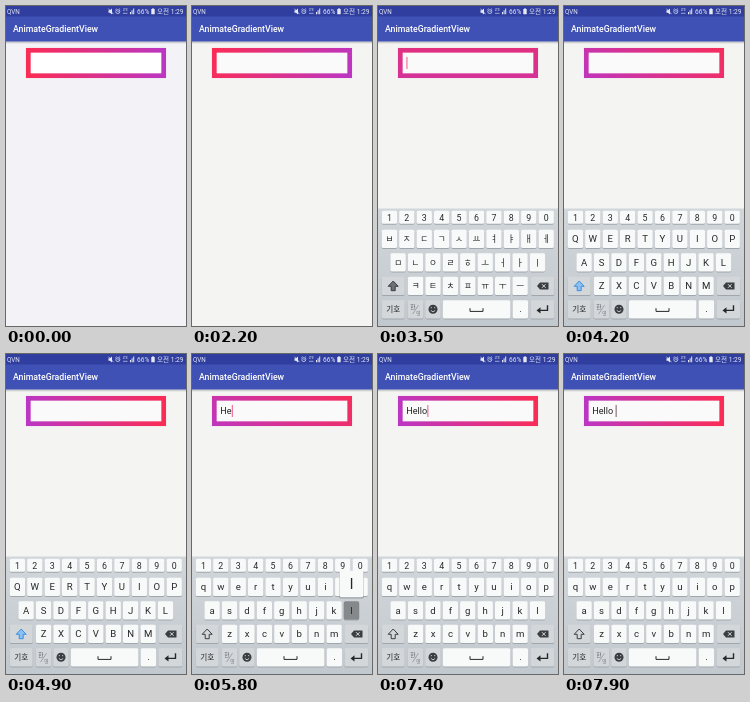
Write an HTML page that moves like this. It is 180 px wide and 320 px high and loops after 8000 ms.

```html
<!DOCTYPE html>
<html lang="ko">
<head>
<meta charset="utf-8">
<title>AnimateGradientView</title>
<style>
html, body { margin: 0; width: 100%; height: 100%; overflow: hidden; background: #f4f4f3; }
svg { display: block; width: 100vw; height: 100vh; }
text { font-family: Roboto, "Noto Sans CJK KR", "Noto Sans CJK JP", "Noto Sans CJK", sans-serif; }
</style>
</head>
<body>
<svg id="stage" viewBox="0 0 180 320" xmlns="http://www.w3.org/2000/svg">
  <defs>
    <linearGradient id="sweep" gradientUnits="userSpaceOnUse">
      <stop offset="0" stop-color="#bb36c4"/><stop offset="1" stop-color="#fb2c54"/>
    </linearGradient>
    <linearGradient id="shade" x2="0" y2="1">
      <stop offset="0" stop-color="#000" stop-opacity=".25"/><stop offset="1" stop-color="#000" stop-opacity="0"/>
    </linearGradient>
    <linearGradient id="tray" x2="0" y2="1">
      <stop offset="0" stop-color="#d1d6da"/><stop offset="1" stop-color="#c2c9ce"/>
    </linearGradient>
  </defs>
  <rect id="page" width="180" height="320"/>
  <rect y="35.5" width="180" height="2.5" fill="url(#shade)"/>
  <rect width="180" height="35.5" fill="#3f51b5"/>
  <rect width="180" height="10.5" fill="#303f9f"/>
  <g fill="#e6e8f5" font-size="6.3">
    <text x="1" y="7.8">QVN</text>
    <text x="131" y="7.8" font-size="6.6">66%</text>
    <text x="177.5" y="7.8" font-size="6.6" text-anchor="end">오전 1:29</text>
    <path d="M102.5 4.2h1.5l2-1.7v6l-2-1.7h-1.5z"/>
    <path d="M102.5 2.7l5 5.5" stroke="#e6e8f5" stroke-width=".7"/>
    <circle cx="111.8" cy="5.6" r="2" fill="none" stroke="#e6e8f5" stroke-width=".7"/>
    <path d="M109.4 3.6l1.2-1.1M114.2 3.6L113 2.5M111.8 4.5v1.2h1" fill="none" stroke="#e6e8f5" stroke-width=".6"/>
    <text x="116.7" y="5.2" font-size="3.2">LTE</text>
    <path d="M117 7.3h4.5" stroke="#e6e8f5" stroke-width=".6"/>
    <path d="M124 8.2h1V6h-1zM125.6 8.2h1V4.3h-1zM127.2 8.2h1V2.5h-1z"/>
    <path d="M145.3 3.1h1v-.8h1.4v.8h1v5.2h-3.4z"/>
  </g>
  <text x="7" y="26.2" fill="#fff" font-size="8.75" font-weight="500">AnimateGradientView</text>
  <rect id="field" x="22.3" y="44.3" width="135.4" height="25.4" stroke="url(#sweep)" stroke-width="4.7"/>
  <text id="entry" x="28.3" y="60.2" font-size="9.1" fill="#222"></text>
  <rect id="caret" y="51" width=".9" height="12"/>
  <g id="keyboard"></g>
</svg>
<script>
const LOOP = 8000, STEP = 100;
const $ = id => document.getElementById(id);
const NS = "http://www.w3.org/2000/svg";
const INK = "#25282a", KEY = "#f8fafa", FN_KEY = "#d3d7da";

function add(parent, tag, attrs, label) {
  const el = document.createElementNS(NS, tag);
  for (const name in attrs) el.setAttribute(name, attrs[name]);
  if (label) el.textContent = label;
  parent.appendChild(el);
  return el;
}
const label = (parent, x, y, text, size = 9, fill = INK) =>
  add(parent, "text", { x, y, "font-size": size, fill, "text-anchor": "middle" }, text);

function key(parent, x, y, width, height = 18.3, fill = KEY) {
  add(parent, "rect", { x, y: y + 0.9, width, height, rx: 1.6, fill: "#9fa6ac" });
  return add(parent, "rect", { x, y, width, height, rx: 1.6, fill });
}
const stroke = (parent, d, color, width = 1) =>
  add(parent, "path", { d, fill: "none", stroke: color, "stroke-width": width, "stroke-linejoin": "round" });

// Letter rows: first key centre, key top
const PITCH = 17.42;
const ROWS = [{ x: 11.4, y: 223.7 }, { x: 20.1, y: 247.2 }, { x: 37.6, y: 270.7 }];
const LAYOUTS = {
  hangul: ["ㅂㅈㄷㄱㅅㅛㅕㅑㅐㅔ", "ㅁㄴㅇㄹㅎㅗㅓㅏㅣ", "ㅋㅌㅊㅍㅠㅜㅡ"],
  upper: ["QWERTYUIOP", "ASDFGHJKL", "ZXCVBNM"],
  lower: ["qwertyuiop", "asdfghjkl", "zxcvbnm"]
};
const board = $("keyboard");
const keys = {}, faces = {};

add(board, "rect", { y: 202.5, width: 180, height: 118, fill: "url(#tray)" });
[..."1234567890"].forEach((digit, i) => {
  const x = 11.4 + i * PITCH;
  key(board, x - 7.7, 204.8, 15.4, 13);
  label(board, x, 214.8, digit, 8.8);
});
ROWS.forEach((row, r) => [...LAYOUTS.lower[r]].forEach((char, i) => {
  const x = row.x + i * PITCH;
  keys[char] = { x, y: row.y, fill: KEY, el: key(board, x - 7.7, row.y, 15.4) };
}));
for (const name in LAYOUTS) {
  faces[name] = add(board, "g", {});
  ROWS.forEach((row, r) => [...LAYOUTS[name][r]].forEach((char, i) =>
    label(faces[name], row.x + i * PITCH, row.y + 12.4, char, name === "hangul" ? 8.6 : 9.6)));
}

const bottom = 294.2;
key(board, 3.7, 270.7, 23, 18.3, FN_KEY);
const shift = stroke(board, "M15.2 275l-5 5.3h3v4.4h4v-4.4h3z", INK);
key(board, 153, 270.7, 23.3, 18.3, FN_KEY);
add(board, "path", { d: "M159 280l3-3.4h8.5v6.8H162z", fill: "#3a3e41" });
stroke(board, "M164 278.2l3.6 3.6m0-3.6l-3.6 3.6", "#fff", 0.8);
key(board, 3.7, bottom, 23, 18.3, FN_KEY);
label(board, 15.2, bottom + 12, "기호", 7.6);
keys.lang = { fill: FN_KEY, el: key(board, 29.6, bottom, 15.7, 18.3, FN_KEY) };
label(board, 34.8, bottom + 8.6, "한", 5.6, "#555b60");
label(board, 40.4, bottom + 14.8, "영", 5, "#777d82");
stroke(board, `M34.5 ${bottom + 14}l6-9`, "#777d82", 0.6);
key(board, 47.2, bottom, 15.5, 18.3, FN_KEY);
add(board, "circle", { cx: 55, cy: bottom + 9.1, r: 4.5, fill: "#3a3e41" });
stroke(board, `M52.8 ${bottom + 10.2}q2.2 3 4.4 0M53.3 ${bottom + 6.8}v1.2M56.7 ${bottom + 6.8}v1.2`, "#e4e7e9", 0.8);
keys[" "] = { fill: KEY, el: key(board, 64.8, bottom, 67.6) };
stroke(board, `M92 ${bottom + 8}v3.2h13v-3.2`, INK);
key(board, 134.6, bottom, 15.5);
label(board, 142.4, bottom + 12, ".", 9.6);
key(board, 152.4, bottom, 23.9, 18.3, FN_KEY);
stroke(board, `M169.5 ${bottom + 5}v5.2h-9.5`, INK, 1.4);
add(board, "path", { d: `M158.5 ${bottom + 10.2}l4-3.2v6.4z`, fill: INK });

const popup = add(board, "g", {});
add(popup, "rect", { x: -12.4, y: 0.8, width: 24.8, height: 27, rx: 2, fill: "#70777d", opacity: 0.55 });
add(popup, "rect", { x: -12, y: 0, width: 24, height: 26.5, rx: 2, fill: KEY });
const popupText = label(popup, 0, 18.4, "", 15);

const PRESSES = [
  ["lang", 3800, 4000], ["h", 5000, 5200], ["e", 5300, 5500], ["l", 5800, 5900],
  ["l", 6000, 6100], ["o", 6200, 6300], [" ", 7600, 7700]
];
const TYPED = PRESSES.slice(1);
// Time and direction of the red end, in degrees
const TURNS = [[0, 180], [2100, 180], [2200, 158], [3500, 90], [4900, 0], [5800, 45], [6800, 33], [7900, 0], [8000, 0]];

function turnAt(t) {
  const i = TURNS.findIndex(([time]) => time > t);
  const [t0, a0] = TURNS[i - 1], [t1, a1] = TURNS[i];
  return (a0 + (a1 - a0) * (t - t0) / (t1 - t0)) * Math.PI / 180;
}
const show = (el, on) => el.setAttribute("display", on ? "inline" : "none");

function drawField(t) {
  const angle = turnAt(t), dx = 70 * Math.cos(angle), dy = -70 * Math.sin(angle);
  const ends = { x1: 90 - dx, y1: 57 - dy, x2: 90 + dx, y2: 57 + dy };
  for (const name in ends) $("sweep").setAttribute(name, ends[name]);
  $("page").setAttribute("fill", t < 2200 ? "#f3f2f6" : "#f4f4f3");
  $("field").setAttribute("fill", t < 2200 ? "#fff" : "#fafafa");

  const done = TYPED.filter(press => press[2] <= t);
  const text = "Hello ".slice(0, done.length);
  $("entry").textContent = text.trim();
  const width = text ? $("entry").getComputedTextLength() : 0;
  $("caret").setAttribute("x", 28.5 + width + (text.endsWith(" ") ? 2.25 : 0));
  $("caret").setAttribute("fill", t < 7600 ? "#f0447c" : "#6b4a58");
  const blinkStart = done.length ? done[done.length - 1][2] : 2400;
  show($("caret"), t >= 2400 && (t - blinkStart) % 1000 < 500);
}

function drawKeyboard(t) {
  const rise = Math.min(1, Math.max(0, (t - 2400) / 400));
  show(board, rise > 0);
  board.setAttribute("transform", `translate(0 ${118 * (1 - rise) ** 2})`);
  const layout = t < 4100 ? "hangul" : t < 5200 ? "upper" : "lower";
  for (const name in faces) show(faces[name], name === layout);
  shift.setAttribute("stroke", layout === "upper" ? "#3d8fe0" : "#3a3e41");
  shift.setAttribute("fill", layout === "upper" ? "#8cc0f2" : layout === "hangul" ? "#6b7176" : "none");

  const press = PRESSES.find(([, from, to]) => t >= from && t < to);
  for (const name in keys) keys[name].el.setAttribute("fill", keys[name].fill);
  show(popup, press && keys[press[0]].x);
  if (!press) return;
  const { x, y, el } = keys[press[0]];
  el.setAttribute("fill", "#85898c");
  if (x) {
    popup.setAttribute("transform", `translate(${x} ${y - 30.5})`);
    popupText.textContent = layout === "upper" ? press[0].toUpperCase() : press[0];
  }
}

const start = performance.now();
function frame() {
  const t = Math.floor((performance.now() - start) % LOOP / STEP) * STEP;
  drawField(t);
  drawKeyboard(t);
  requestAnimationFrame(frame);
}
frame();
</script>
</body>
</html>
```
